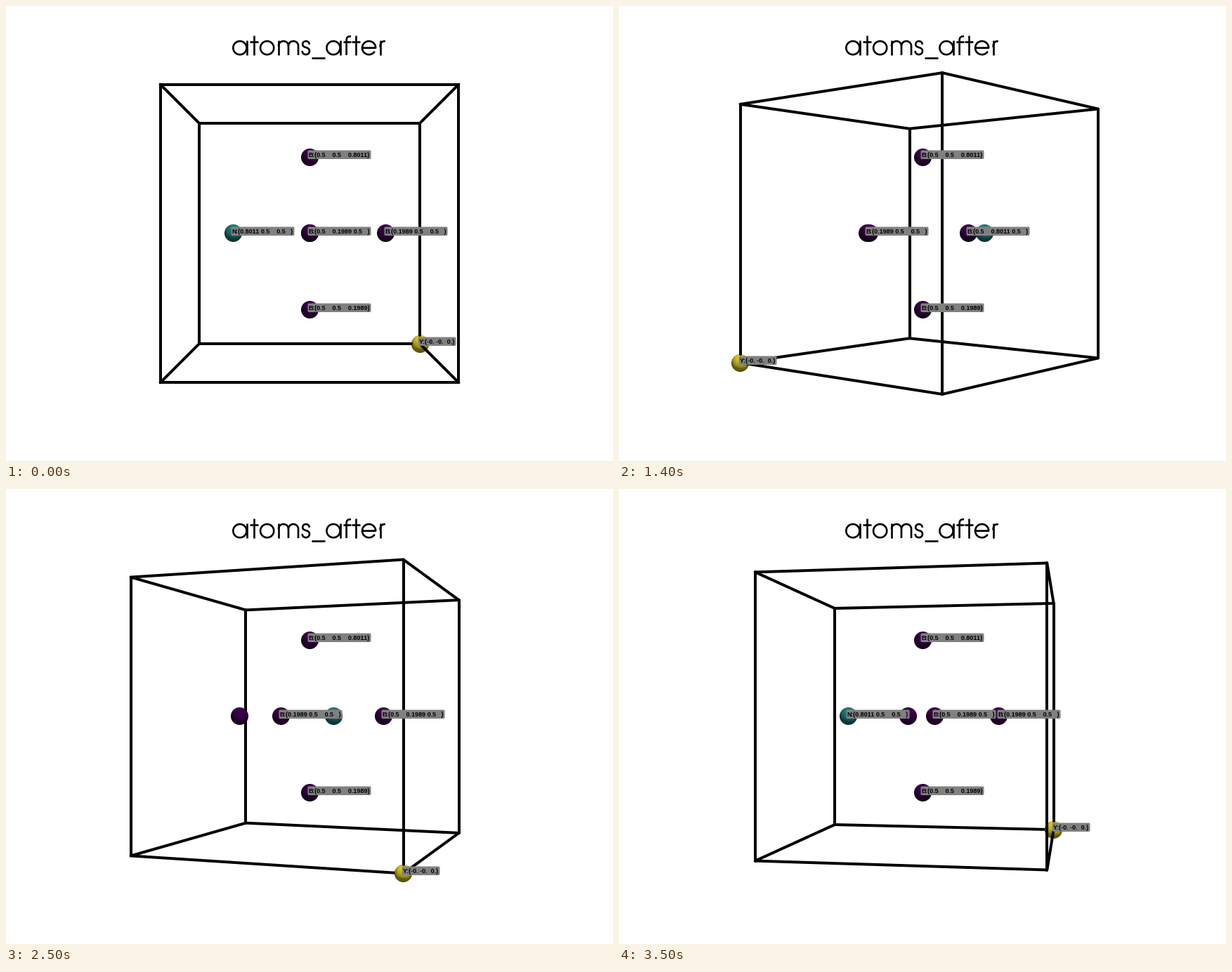
Recreate the animation shown at these times as a matplotlib script. Size 864 by 648 pixels, loop 3.6 s.

```python
import itertools

import numpy as np
import matplotlib.pyplot as plt
from matplotlib.animation import FuncAnimation
from matplotlib.patches import FancyBboxPatch

W, H, DPI = 864, 648, 100
FRAMES, INTERVAL = 36, 100
PT = 72 / DPI
FOCAL = H / 2 / np.tan(np.radians(15))
DIST = np.sqrt(3) / 2 / np.sin(np.radians(15))
RADIUS = 12.5
LO, HI = 0.1989, 0.8011

PURPLE, TEAL, YELLOW = (68, 1, 84), (33, 144, 140), (253, 231, 36)

# Position, symbol, label, label width, colour; earlier labels win overlaps
ATOMS = [
    ((0, 0, 0), "Y", ":(-0. -0.  0.)", 54, YELLOW),
    ((LO, .5, .5), "B", ":(0.1989 0.5    0.5   )", 90, PURPLE),
    ((.5, LO, .5), "B", ":(0.5    0.1989 0.5   )", 90, PURPLE),
    ((.5, .5, LO), "B", ":(0.5    0.5    0.1989)", 90, PURPLE),
    ((.5, .5, HI), "B", ":(0.5    0.5    0.8011)", 90, PURPLE),
    ((.5, HI, .5), "B", ":(0.5    0.8011 0.5   )", 90, PURPLE),
    ((HI, .5, .5), "N", ":(0.8011 0.5    0.5   )", 90, TEAL),
]
CORNERS = list(itertools.product((0, 1), repeat=3))
EDGES = [(np.array(a, float), np.array(b, float))
         for a, b in itertools.combinations(CORNERS, 2)
         if sum(abs(p - q) for p, q in zip(a, b)) == 1]

fig = plt.figure(figsize=(W / DPI, H / DPI), dpi=DPI, facecolor="white")
ax = fig.add_axes([0, 0, 1, 1])


def project(p, theta):
    """Screen x, y and depth of a point seen from an orbiting camera."""
    x, y, z = np.asarray(p, float) - .5
    s, c = np.sin(theta), np.cos(theta)
    depth = DIST - (x * s + y * c)
    k = FOCAL / depth
    return W / 2 + k * (y * s - x * c), H / 2 - k * z, depth


def sphere(rgb, n=100):
    """Shaded ball lit by key, fill, head and two back lights."""
    u = (np.arange(n) + .5) / n * 2 - 1
    x, y = np.meshgrid(u, -u)
    r2 = x * x + y * y
    z = np.sqrt(np.clip(1 - r2, 0, 1))
    lights = [(10, 50, .75), (0, -75, .25), (0, 0, .25),
              (110, 0, .21), (-110, 0, .21)]
    shade = np.zeros_like(x)
    for az, el, power in lights:
        az, el = np.radians((az, el))
        dot = (x * np.sin(az) * np.cos(el) + y * np.sin(el)
               + z * np.cos(az) * np.cos(el))
        shade += power * np.clip(dot, 0, None)
    img = np.empty((n, n, 4))
    img[..., :3] = np.clip(shade[..., None] * np.array(rgb) / 255, 0, 1)
    img[..., 3] = r2 <= 1
    return img


def arc(cx, cy, rx, ry, start, end):
    t = np.radians(np.linspace(start, end, 50))
    return list(zip(cx + rx * np.cos(t), cy + ry * np.sin(t)))


def bezier(p0, p1, p2, p3):
    t = np.linspace(0, 1, 24)[:, None]
    p0, p1, p2, p3 = map(np.array, (p0, p1, p2, p3))
    pts = ((1 - t) ** 3 * p0 + 3 * t * (1 - t) ** 2 * p1
           + 3 * t * t * (1 - t) * p2 + t ** 3 * p3)
    return [tuple(p) for p in pts]


# Geometric letterforms in em units: advance and strokes
GLYPHS = {
    "a": (.683, [arc(.329, .273, .252, .252, 0, 360),
                 [(.585, 0), (.585, .547)]]),
    "t": (.339, [[(.17, 0), (.17, .74)], [(.018, .513), (.324, .513)]]),
    "o": (.655, [arc(.327, .273, .252, .252, 0, 360)]),
    "m": (.938, [[(.1, 0), (.1, .547)],
                 arc(.285, .345, .185, .18, 180, 0) + [(.47, 0)],
                 arc(.655, .345, .185, .18, 180, 0) + [(.84, 0)]]),
    "s": (.388, [bezier((.315, .4), (.315, .565), (.06, .565), (.065, .4))
                 + bezier((.065, .4), (.07, .25), (.325, .33), (.32, .15))
                 + bezier((.32, .15), (.315, -.02), (.05, -.02), (.05, .16))]),
    "_": (.5, [[(0, -.1), (.5, -.1)]]),
    "f": (.314, [[(.135, 0)] + bezier((.135, .54), (.135, .66),
                                      (.18, .71), (.305, .705)),
                 [(.015, .513), (.3, .513)]]),
    "e": (.65, [[(.05, .27)] + arc(.324, .273, .252, .252, 0, 328)]),
    "r": (.301, [[(.095, 0), (.095, .547)],
                 bezier((.095, .3), (.095, .46), (.16, .53), (.285, .522))]),
}


def draw_title(text, x, base, size):
    for ch in text:
        advance, strokes = GLYPHS[ch]
        for stroke in strokes:
            px, py = np.array(stroke).T
            ax.plot(x + px * size, base - py * size, color="black",
                    lw=.07 * size * PT, solid_capstyle="butt", zorder=50)
        x += advance * size


class Label:
    def __init__(self, symbol, coords, width):
        self.width = width
        self.box = FancyBboxPatch((0, 0), width, 12.5, fc="#808080", ec="none",
                                  boxstyle="round,pad=0,rounding_size=1.8",
                                  zorder=100)
        ax.add_patch(self.box)
        style = dict(family="Liberation Sans", weight="bold", size=9 * PT,
                     color="black", va="baseline", zorder=101)
        self.symbol = ax.text(0, 0, symbol, **style)
        self.coords = ax.text(0, 0, coords, **style)

    def place(self, x, y, taken):
        x, y = round(x) - 2.5, round(y)
        clash = any(abs(y - ty) < 12.5 and x < tx + tw and tx < x + self.width
                    for tx, ty, tw in taken)
        for artist in (self.box, self.symbol, self.coords):
            artist.set_visible(not clash)
        if clash:
            return
        taken.append((x, y, self.width))
        self.box.set_x(x)
        self.box.set_y(y - 9.5)
        self.symbol.set_position((x + 1, y))
        self.coords.set_position((x + 6.5, y))


lines = [ax.plot([], [], color="black", lw=4 * PT,
                 solid_capstyle="round")[0] for _ in EDGES]
balls = [ax.imshow(sphere(rgb), extent=(0, 1, 1, 0), aspect="auto",
                   interpolation="antialiased")
         for *_, rgb in ATOMS]
labels = [Label(symbol, coords, width)
          for _, symbol, coords, width, _ in ATOMS]
draw_title("atoms_after", 320.4, 70, 38)
ax.set_xlim(0, W)
ax.set_ylim(H, 0)
ax.axis("off")


def update(i):
    theta = 2 * np.pi * i / FRAMES
    camera = .5 + DIST * np.array([np.sin(theta), np.cos(theta), 0])

    for line, (a, b) in zip(lines, EDGES):
        z = 10 - project((a + b) / 2, theta)[2]
        if not a.any():
            # Edges leave the corner ball through its front or its back
            depth = project(a, theta)[2]
            exit_pt = b * RADIUS * depth / FOCAL
            front = b @ (camera - exit_pt) > 0
            z = 10 - depth + (.001 if front else -.001)
            a = exit_pt if front else a
        (x0, y0, _), (x1, y1, _) = project(a, theta), project(b, theta)
        line.set_data([x0, x1], [y0, y1])
        line.set_zorder(z)

    taken = []
    for (pos, *_), ball, label in zip(ATOMS, balls, labels):
        x, y, depth = project(pos, theta)
        ball.set_extent((x - RADIUS, x + RADIUS, y + RADIUS, y - RADIUS))
        ball.set_zorder(10 - depth)
        label.place(x, y, taken)
    return []


anim = FuncAnimation(fig, update, frames=FRAMES, interval=INTERVAL,
                     init_func=lambda: update(0), repeat=True, repeat_delay=0)
plt.show()
```
